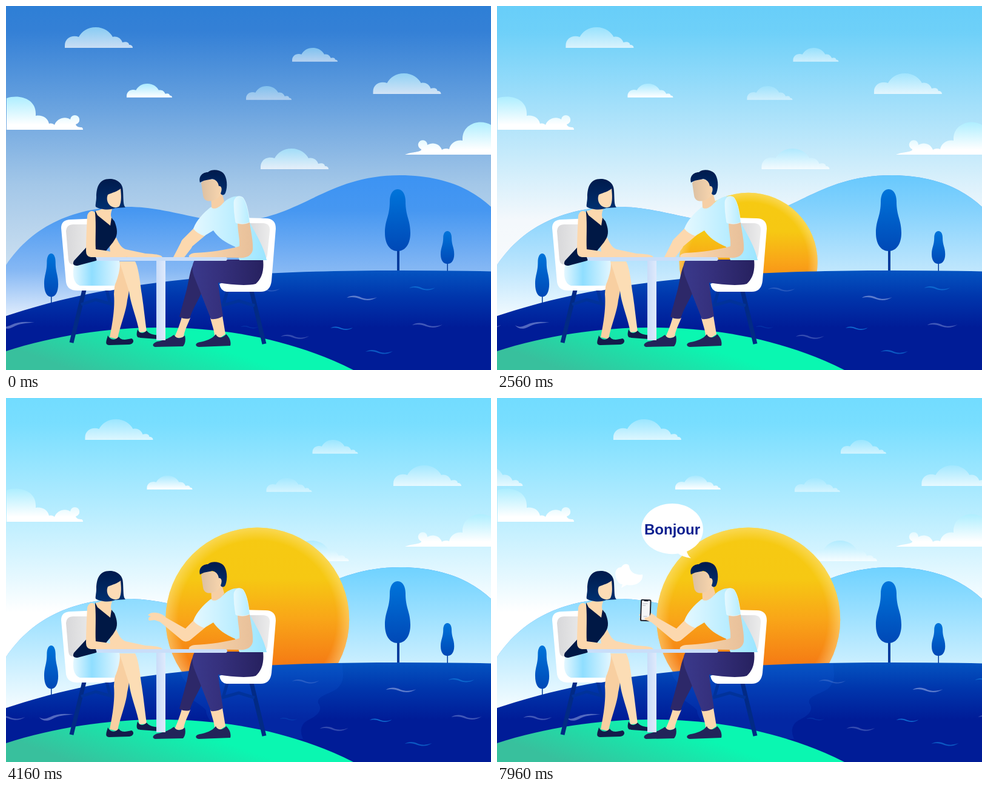
An HTML page that plays this animation: 800x600 px, repeating every 8 s.

```html
<!DOCTYPE html>
<html lang="en">
<head>
<meta charset="utf-8">
<title>Sunrise conversation</title>
<style>
  html, body { margin: 0; width: 100%; height: 100%; overflow: hidden; }
  svg { display: block; width: 100vw; height: 100vh; }
  .skin { fill: #fcd8ae; }
  .navy { fill: #001f57; }
  .bubble text { font: bold 24px "Liberation Sans", Arial, sans-serif; fill: #0a1f8f; }
</style>
</head>
<body>
<svg viewBox="0 0 800 600">
  <defs>
    <linearGradient id="nightSky" gradientUnits="userSpaceOnUse" x2="0" y2="420">
      <stop stop-color="#2e7fd6"/><stop offset=".1" stop-color="#3480d6"/><stop offset=".36" stop-color="#629ede"/>
      <stop offset=".7" stop-color="#a3c7e8"/><stop offset="1" stop-color="#c9def0"/>
    </linearGradient>
    <linearGradient id="daySky" gradientUnits="userSpaceOnUse" x2="0" y2="420">
      <stop stop-color="#72dcff"/><stop offset=".1" stop-color="#78deff"/><stop offset=".36" stop-color="#a8e9ff"/>
      <stop offset=".7" stop-color="#e5f8ff"/><stop offset=".84" stop-color="#fff"/>
    </linearGradient>
    <linearGradient id="nightHill" gradientUnits="userSpaceOnUse" y1="279" x2="0" y2="510">
      <stop stop-color="#3c93f3"/><stop offset=".25" stop-color="#4697f1"/><stop offset=".68" stop-color="#86b8f4"/><stop offset="1" stop-color="#dfecfc"/>
    </linearGradient>
    <linearGradient id="dayHill" gradientUnits="userSpaceOnUse" y1="279" x2="0" y2="510">
      <stop stop-color="#6fd2ff"/><stop offset="1" stop-color="#f4fcff"/>
    </linearGradient>
    <linearGradient id="cloudFill" x2="0" y2="1"><stop stop-color="#a9e9ff"/><stop offset="1" stop-color="#fff"/></linearGradient>
    <linearGradient id="leftCloudFill" gradientUnits="userSpaceOnUse" y1="150" x2="0" y2="204"><stop stop-color="#aeeeff"/><stop offset=".85" stop-color="#fff"/></linearGradient>
    <linearGradient id="rightCloudFill" gradientUnits="userSpaceOnUse" y1="191" x2="0" y2="245"><stop stop-color="#aeeeff"/><stop offset=".85" stop-color="#fff"/></linearGradient>
    <linearGradient id="sunFill" x2="0" y2="1">
      <stop stop-color="#f6ca12"/><stop offset=".28" stop-color="#f6c813"/><stop offset=".5" stop-color="#f9a518"/><stop offset=".75" stop-color="#f57a14"/>
    </linearGradient>
    <radialGradient id="sunRim"><stop offset=".86" stop-color="#ffe9a0" stop-opacity="0"/><stop offset="1" stop-color="#ffe9a0" stop-opacity=".45"/></radialGradient>
    <linearGradient id="seaFill" gradientUnits="userSpaceOnUse" y1="436" x2="0" y2="530">
      <stop stop-color="#0453c1"/><stop offset=".45" stop-color="#0036ac"/><stop offset="1" stop-color="#001c97"/>
    </linearGradient>
    <linearGradient id="grass" gradientUnits="userSpaceOnUse" x1="260" y1="530" x2="220" y2="640"><stop stop-color="#0af7b1"/><stop offset="1" stop-color="#38c09d"/></linearGradient>
    <linearGradient id="leaf" x2="0" y2="1"><stop stop-color="#0074da"/><stop offset="1" stop-color="#0048b6"/></linearGradient>
    <linearGradient id="panel" x2="1"><stop stop-color="#d8d8da"/><stop offset="1" stop-color="#ececec"/></linearGradient>
    <linearGradient id="skirt"><stop stop-color="#e4f7ff"/><stop offset=".4" stop-color="#8fdeff"/><stop offset="1" stop-color="#e2f6ff"/></linearGradient>
    <linearGradient id="shirt"><stop stop-color="#e4f8ff"/><stop offset="1" stop-color="#9be5ff"/></linearGradient>
    <linearGradient id="sleeve"><stop stop-color="#e4f8ff"/><stop offset="1" stop-color="#b4ecff"/></linearGradient>
    <linearGradient id="pants"><stop stop-color="#3a398b"/><stop offset=".4" stop-color="#35307c"/><stop offset="1" stop-color="#27215f"/></linearGradient>
    <linearGradient id="faceFill"><stop stop-color="#dcc0a2"/><stop offset="1" stop-color="#f9d6ae"/></linearGradient>
    <linearGradient id="armFill"><stop stop-color="#fdd9ae"/><stop offset="1" stop-color="#e8c09a"/></linearGradient>
    <linearGradient id="hair" x2="0" y2="1"><stop stop-color="#001a4c"/><stop offset="1" stop-color="#003070"/></linearGradient>
    <linearGradient id="tableLeg"><stop stop-color="#c9dcf8"/><stop offset="1" stop-color="#dfeafc"/></linearGradient>

    <path id="hills" d="M0 427C45 360 115 331 200 331C270 331 320 358 385 355C490 347 530 279 650 279C715 279 765 298 800 331V520H0Z"/>
    <path id="cloud" d="M0 34V30C0 18 12 12 23 16C28 7 37 0 51 0C65 0 75 8 79 16C87 14 93 19 95 25C101 23 106 25 106 29C110 29 112 31 112 34Z"/>
    <path id="crown" d="M21 0C12 0 8 10 8 20C8 45 0 50 0 72C0 90 8 102 21 102C34 102 42 90 42 72C42 50 34 45 34 20C34 10 30 0 21 0Z"/>
    <path id="ripple" d="M0 0C8-5 17-4 25 0C33 3 42 2 50-1C41 5 32 5 23 2C15-1 9-2 0 0Z"/>
    <path id="curl" d="M0 2C6 6 11 5 18 2C30-4 44-4 57-2C42-2 31 0 22 5C12 10 5 8 0 2Z"/>
    <clipPath id="aboveTable"><rect width="800" height="414"/></clipPath>
  </defs>

  <rect width="800" height="600" fill="url(#nightSky)"/>
  <rect class="day" width="800" height="600" fill="url(#daySky)"/>

  <path fill="url(#leftCloudFill)" d="M1 204V152C22 145 49 153 49 177V181C59 179 69 184 71 194C75 193 78 194 80 196C84 185 98 181 106 187A7.6 7.6 0 1 1 115 195C116 199 120 200 125 200Q127 201 127 204Z"/>
  <path fill="url(#rightCloudFill)" d="M800 245V196C782 185 753 194 753 219V222C743 220 733 226 731 236C727 234 722 235 719 237C715 226 703 224 695 229A7.6 7.6 0 1 0 685 236C686 241 670 240 658 245Z"/>
  <g id="clouds"></g>

  <use href="#hills" fill="url(#nightHill)"/>
  <use class="day" href="#hills" fill="url(#dayHill)"/>

  <g id="sun"><circle r="1" fill="url(#sunFill)"/><circle r="1" fill="url(#sunRim)"/></g>

  <path fill="url(#seaFill)" d="M0 511C140 464 310 436 650 436Q730 436 800 437.500V600H0Z"/>
  <path id="reflection" fill="#1a66e4" d="M288 450Q400 439 555 437C555 455 561 466 545 480C530 489 512 492 515 503C524 515 512 524 500 530C486 537 484 548 490 562H345C350 540 330 530 330 515C318 500 300 500 300 480C302 466 288 465 288 450Z"/>
  <g id="waves"></g>

  <g fill="url(#leaf)">
    <path d="M645 400h4v36h-4zM727.500 422h1.500v15h-1.500zM74 478h1.500v11h-1.500z" fill="#043c9c"/>
    <use href="#crown" x="625" y="302"/>
    <use href="#crown" transform="translate(717 371) scale(.53)"/>
    <use href="#crown" transform="translate(63 408) scale(.55 .7)"/>
  </g>

  <path fill="url(#grass)" d="M0 569C80 543 170 530 255 530C370 530 480 553 573 600H0Z"/>

  <g fill="none" stroke="#022a85">
    <path stroke-width="7" d="M129 468L108 555M405 470L426 557"/>
    <path stroke-width="5" stroke="#01329a" d="M166 468L172 491M365 470L358 494M124 492L148 484L176 492M356 494L384 486L410 494"/>
  </g>
  <g fill="#fff">
    <path d="M91 366Q91 352 107 352L152 350V420L185 440L187 458Q183 469 172 469H118Q101 469 99 455Z"/>
    <path d="M390 349L428 350Q445 350 445 367L438 453Q436 471 420 471H364Q354 470 352 458L400 440Z"/>
    <g fill="url(#panel)">
      <path d="M99 371Q100 360 111 360H146V426H110Q104 426 103 418Z"/>
      <path d="M400 358H425Q436 359 435 371L431 410Q430 419 422 419H400Z"/>
    </g>
  </g>

  <!-- Woman -->
  <path fill="#f8cfa1" d="M187 423C184 440 179 455 178 475C180 500 175 525 171 546L184 549C187 530 198 505 200 485C205 462 207 445 200 425Z"/>
  <path fill="url(#skirt)" d="M113 424C108 444 112 458 122 461H179C184 450 190 430 187 420L150 418Z"/>
  <path fill="#fcddb5" d="M187 421H213C219 432 221 455 224 475C227 495 229 515 232 537L220 538C216 515 205 490 203 470C198 456 195 445 187 421Z"/>
  <path fill="#131b4b" d="M168 543C166 551 162 558 170 559L203 558C211 557 212 550 207 548C198 550 190 552 186 545C180 552 172 551 168 543ZM217 533C214 544 216 547 222 547L250 549C258 548 259 543 254 542C245 543 236 541 232 535C226 541 220 540 217 533Z"/>
  <path class="skin" d="M170 386L182 382C187 393 190 398 197 401L230 408C242 409 256 409 258 414H200L172 407Z"/>
  <path class="skin" d="M164 324L177 330C173 340 171 346 176 352L172 364L150 346L147 338C157 336 163 334 164 324Z"/>
  <path fill="#001845" d="M147 337L151 345L172 362L174 349L179 355C183 366 186 376 178 387C174 394 165 401 160 413L148 420L118 428Q108 428 112 420L136 394L146 385Z"/>
  <path class="skin" d="M134 346C136 337 144 336 147 341C149 361 147 384 148 401C162 403 182 405 200 414H140Q132 413 132 404C132 385 133 365 134 346Z"/>
  <path fill="url(#hair)" d="M171 285C154 285 149 298 149 315C149 322 147 328 148 331C156 336 172 337 180 333L197 332C193 328 194 320 193 305C193 292 183 285 171 285Z"/>
  <path fill="#fcdcb6" d="M168 311C175 308 185 305 189 301C190 312 191 322 187 330C182 334 174 332 170 327C166 322 166 315 168 311Z"/>

  <!-- Man -->
  <path class="skin" d="M290 513L304 514C299 527 294 535 293 546L277 548C282 537 286 527 290 513ZM337 514L357 511L362 541L350 549L344 545C344 535 340 527 337 514Z"/>
  <path fill="#2d2869" d="M312 420C302 435 302 455 296 475L286 512Q293 517 303 515C308 498 318 485 326 465L340 420Z"/>
  <path fill="url(#pants)" d="M312 418H424Q427 445 412 458C395 462 370 459 350 456C352 475 355 492 358 511Q350 517 338 516C330 495 320 470 312 450C306 436 306 425 312 418Z"/>
  <path fill="#22245a" d="M277 542C282 550 290 548 295 543C297 552 295 558 292 561L246 562C240 561 242 555 250 553C262 551 270 547 277 542ZM346 541C350 549 358 547 363 541C368 545 372 553 370 560L318 562C311 561 312 555 320 554C330 552 340 549 346 541Z"/>
  <g clip-path="url(#aboveTable)">
    <path class="skin" d="M310 366L329 378L305 398A9 9 0 0 1 291 385Z"/>
    <g id="forearm" class="skin">
      <path d="M303 384L264 362C260 357 254 355 248 354C242 353 237 354 234 358L239 360C235 361 234 364 236 367L245 366L254 369L290 399A9.500 9.500 0 0 0 303 384Z"/>
    </g>
  </g>
  <path fill="url(#shirt)" d="M337 332L358 325C366 316 380 311 390 315C398 322 400 345 402 357C412 375 426 398 430 419H385L378 397C362 390 350 382 342 370L327 379Q315 375 309 367C315 352 325 342 337 332Z"/>
  <path fill="url(#armFill)" d="M382 357H402C404 372 408 388 407 402C405 412 396 416 385 415L302 414C300 411 306 407 312 407C335 406 365 402 385 396C386 385 382 370 382 357Z"/>
  <path fill="url(#sleeve)" stroke="#eafaff" stroke-width=".7" d="M376 325C376 315 384 311 391 316C399 328 400 345 402 356C396 360 385 360 379 357C377 345 376 335 376 325Z"/>
  <path fill="#f6cfa5" d="M338 312L356 308L360 322C352 334 342 336 339 332Z"/>
  <path fill="url(#faceFill)" d="M322 292C325 286 335 284 340 286C347 285 354 292 356 300C356 309 352 318 340 321C332 323 326 320 325 312Z"/>
  <path fill="url(#hair)" d="M320 291C317 280 325 274 333 274C340 268 352 270 358 275C365 282 366 298 362 308C360 313 355 312 354 309C358 300 354 296 351 297C350 290 346 286 340 285C332 287 326 287 320 291Z"/>

  <rect x="248" y="419" width="15" height="132" fill="url(#tableLeg)"/>
  <path fill="#c9def9" d="M148 414H363Q367 417 363 420H150Z"/>

  <g id="phone">
    <g transform="rotate(2 245 350)">
      <rect x="236.500" y="332" width="17.500" height="36" rx="2.500" fill="#202430"/>
      <rect x="238.500" y="334" width="13.500" height="32" rx="1" fill="#f5f6f8"/>
      <path fill="#202430" d="M242 333h7v2h-7z"/>
      <path stroke="#b8bcc6" d="M240 339h8M240 342h5M242 360h6"/>
    </g>
    <path class="skin" d="M266 364L254 354C253 359 250 362 244 362Q242 365 246 366L256 370Z"/>
  </g>

  <g id="bigBubble" class="bubble">
    <path fill="#fff" d="M289 174C318 174 340 193 340 216C340 234 329 246 313 253Q315 260 320 264Q306 262 299 256.500C264 261 238 241 238 216C238 193 260 174 289 174Z"/>
    <text x="289" y="224.500" text-anchor="middle">Bonjour</text>
  </g>
  <path id="smallBubble" fill="#fff" d="M199 302C192 291 195 279 205 279C208 273 216 272 218 277C219 287 229 293 240 291C242 303 228 311 214 308L205 313L207 307C203 307 201 305 199 302Z"/>
</svg>
<script>
const LOOP = 8000;
const find = id => document.getElementById(id);
const place = (id, transform) => find(id).setAttribute('transform', transform);

// x, y, scale, opacity
const clouds = [
  [97, 35, 1, .72], [199, 128, .67, 1], [396, 132, .67, .5],
  [472, 69, .67, .6], [605.5, 111, 1, .72], [420, 235, 1, .75], [-164.5, 111, 1, .72]
];
find('clouds').innerHTML = clouds.map(([x, y, scale, opacity]) =>
  `<use href="#cloud" transform="translate(${x} ${y}) scale(${scale})" opacity="${opacity}" fill="url(#cloudFill)"/>`).join('');

// shape, x, y, scale, colour, opacity
const pale = '#b9c4f0', bright = '#1480e0';
const waves = [
  ['ripple', 562, 481, 1, pale, .5], ['ripple', 665, 465, .86, bright, .6],
  ['ripple', 670, 526, 1, pale, .35], ['ripple', 535, 531, .74, bright, .75],
  ['ripple', 593, 570, .9, bright, .6], ['ripple', 453, 545, .94, pale, .28],
  ['ripple', 387, 529, .6, bright, .2], ['ripple', 407, 467, .9, pale, .2],
  ['curl', -10, 524, 1, pale, .45], ['ripple', -80, 527, .94, pale, .35]
];
find('waves').innerHTML = waves.map(([shape, x, y, scale, fill, opacity]) =>
  `<use href="#${shape}" transform="translate(${x} ${y}) scale(${scale})" fill="${fill}" opacity="${opacity}"/>`).join('');

const progress = (t, from, to) => Math.min(1, Math.max(0, (t - from) / (to - from)));
const easeOut = p => 1 - (1 - p) ** 3;
const easeInOut = p => p * p * (3 - 2 * p);

// Monotone cubic through [time, value] keys, held at both ends
function follow(t, keys) {
  const last = keys.length - 1;
  if (t <= keys[0][0]) return keys[0][1];
  if (t >= keys[last][0]) return keys[last][1];
  const i = keys.findIndex(key => key[0] > t) - 1;
  const secant = k => (keys[k + 1][1] - keys[k][1]) / (keys[k + 1][0] - keys[k][0]);
  const slope = k => {
    if (k === 0 || k === last) return 0;
    const a = secant(k - 1), b = secant(k);
    return a * b > 0 ? 2 * a * b / (a + b) : 0;
  };
  const [t0, v0] = keys[i], [t1, v1] = keys[i + 1];
  const span = t1 - t0, p = (t - t0) / span;
  return v0 + (v1 - v0) * easeInOut(p)
    + span * p * (1 - p) * (slope(i) * (1 - p) - slope(i + 1) * p);
}

const popAt = (id, x, y, scale) =>
  place(id, `translate(${x} ${y}) scale(${scale}) translate(${-x} ${-y})`);

function draw(t) {
  const s = t / 1000;
  place('clouds', `translate(${3.8 * s + 1.02 * s * s})`);
  place('waves', `translate(${15.5 * s})`);

  const daylight = follow(t, [[1920, 0], [2240, .52], [2560, .85], [3200, 1]]);
  document.querySelectorAll('.day').forEach(el => el.setAttribute('opacity', daylight));

  const radius = follow(t, [[1200, 10], [1920, 58], [2560, 114], [3320, 148.5], [3900, 151.5]]);
  const sunY = follow(t, [[1200, 530], [1920, 483], [2560, 422], [3320, 371.5], [3900, 365]]);
  place('sun', `translate(414.7 ${sunY}) scale(${radius})`);
  find('reflection').setAttribute('opacity', .15 * progress(t, 2900, 3900));

  place('forearm', `rotate(${-92 * (1 - easeInOut(progress(t, 3160, 4040)))} 298 392)`);
  popAt('phone', 250, 362, easeOut(progress(t, 4440, 4840)));
  popAt('bigBubble', 320, 264, easeOut(progress(t, 6240, 6720)));
  popAt('smallBubble', 202, 313, easeOut(progress(t, 7640, 7960)));
}

const start = performance.now();
function tick() {
  draw((performance.now() - start) % LOOP);
  requestAnimationFrame(tick);
}
tick();
</script>
</body>
</html>
```
